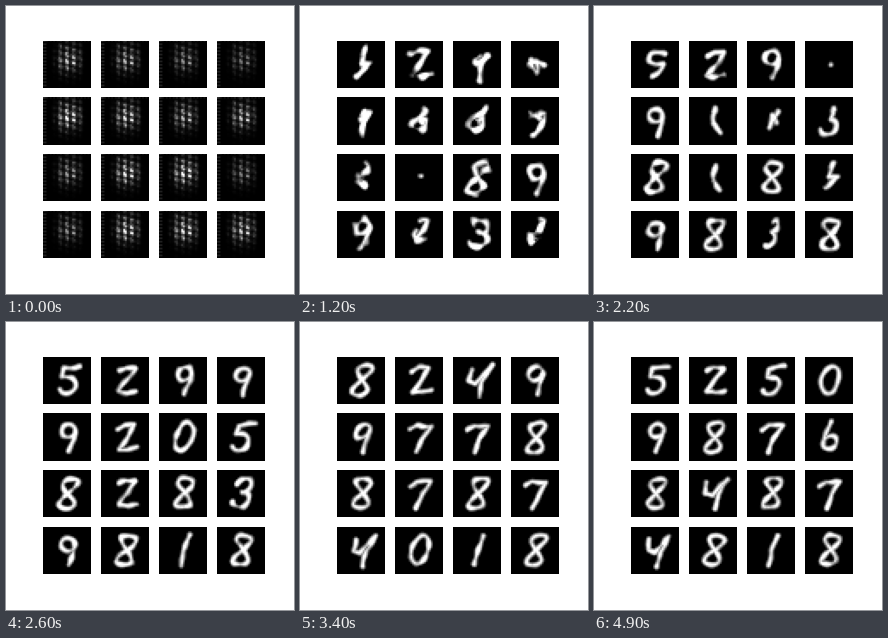
These frames come from a looping animation (288 px wide and 288 px high, 5.1 s). A matplotlib script:

```python
import numpy as np
import matplotlib.pyplot as plt
from matplotlib.animation import FuncAnimation

SIZE, FRAMES, LAST = 28, 51, 49
KEYS = [6, 18, 26, 34, 42, 49]  # epochs at which a tile resembles each of its digits
DIGITS = ["395885", "222222", "499455", "369900",
          "499999", "892798", "890777", "435886",
          "188888", "692794", "888888", "993777",
          "999444", "388008", "331111", "188888"]

Y, X = np.mgrid[0:SIZE, 0:SIZE].astype(float)


def arc(cx, cy, rx, ry, start, stop):
    t = np.radians(np.linspace(start, stop, 30))
    return np.column_stack([cx + rx * np.cos(t), cy + ry * np.sin(t)])


def stroke(*parts, n=64):
    """Join points and arcs into one pen stroke of n evenly spaced points."""
    path = np.vstack(parts)
    steps = np.hypot(*np.diff(path, axis=0).T)
    length = np.concatenate([[0], np.cumsum(steps)])
    at = np.linspace(0, length[-1], n)
    return np.column_stack([np.interp(at, length, axis) for axis in path.T])


def figure_eight():
    t = np.linspace(0, 2 * np.pi, 80)
    return np.column_stack([.75 * np.sin(2 * t), -np.cos(t)])


NINE = stroke(arc(-.1, -.4, .7, .45, -20, -380), (.5, 0), (.3, 1))
PEN = {
    "0": stroke(arc(0, 0, .85, .95, -60, 300)),
    "1": stroke((.3, -1), (-.1, 0), (-.1, 1)),
    "2": stroke((-.9, -.6), (-.3, -.85), (.7, -.85), (.1, 0), (-.6, .8), (.3, .85), (1.2, .7)),
    "3": stroke(arc(0, -.5, .75, .45, 200, 450), arc(0, .4, .85, .5, -90, 160)),
    "4": stroke((-.9, -.7), (-.9, .05), (-.2, .2), (1.1, -1), (.4, .1), (.4, 1.1)),
    "5": stroke((1, -.95), (-.6, -.75), (-.7, -.2), arc(0, .4, .8, .55, -90, 150)),
    "6": -NINE,
    "7": stroke((-1.2, -.5), (-.6, -.8), (.8, -.75), (.2, .1), (-.1, 1)),
    "8": stroke(figure_eight()),
    "9": NINE,
}


def waves(rng, scale, epoch):
    """Smooth noise that drifts a little from epoch to epoch."""
    angles, phases = rng.uniform(0, 2 * np.pi, (2, 5))
    drift = rng.normal(0, .25, 5) * epoch
    return sum(np.sin(scale * (X * np.cos(a) + Y * np.sin(a)) + p + d)
               for a, p, d in zip(angles, phases, drift)) / 2.5


def pen_points(index, epoch):
    place = np.interp(epoch, KEYS, range(len(KEYS)))
    i = min(int(place), len(KEYS) - 2)
    u = place - i
    u = u * u * (3 - 2 * u)
    x, y = ((1 - u) * PEN[DIGITS[index][i]] + u * PEN[DIGITS[index][i + 1]]).T
    return 14.3 + 5.8 * x - 1.6 * y, 13.6 + 8.6 * y


def digit(index, epoch):
    """A soft stroke, torn into blobs early on and cleaner with every epoch."""
    rng = np.random.default_rng(20 + index)
    youth = np.exp(-epoch / 9)
    bend, p, q = .4 + youth, *rng.uniform(0, 2 * np.pi, 2)
    px, py = pen_points(index, epoch)
    px, py = (px + bend * np.sin(.3 * py + p + .3 * epoch),
              py + bend * np.sin(.3 * px + q - .3 * epoch))
    gap = np.hypot(X[..., None] - px, Y[..., None] - py).min(axis=-1)
    tear = (.35 + 2.4 * youth) * waves(rng, .75, epoch)
    return np.clip(.5 + (1.25 + .4 * youth + tear - gap) / 1.7, 0, 1)


def lattice(index):
    """Untrained output: a faint dotted grid, brightest above the middle."""
    grain = np.random.default_rng(5).uniform(.3, 1.1, X.shape)
    gain = np.random.default_rng(index).uniform(.6, 1.5)
    columns = .1 + np.cos(np.pi * (X - 9.5) / 4) ** 2
    rows = .25 + .75 * np.cos(np.pi * (Y - 8 - .3 * X) / 4) ** 2
    envelope = np.exp(-((X - 14.5) / 7) ** 4 - ((Y - 10.5) / 7.5) ** 2)
    border = .13 * (X < 2) * (Y % 2 == 0) + .07 * (Y < 1) * (X % 2 == 0)
    return np.clip(gain * grain * columns * rows * envelope + border, 0, 1)


def picture(index, epoch):
    grown = min(1, epoch / 2)
    return np.maximum(grown * digit(index, epoch), max(0, 1 - epoch / 3) * lattice(index))


fig, axes = plt.subplots(4, 4, figsize=(4, 4), dpi=72, facecolor="white")
fig.subplots_adjust(left=.125, right=.9, bottom=.125, top=.88, wspace=.2, hspace=.2)
images = []
for ax in axes.flat:
    ax.axis("off")
    images.append(ax.imshow(np.zeros((SIZE, SIZE)), cmap="gray", vmin=0, vmax=1))


def update(frame):
    for index, image in enumerate(images):
        image.set_data(picture(index, min(frame, LAST)))
    return images


anim = FuncAnimation(fig, update, frames=FRAMES, interval=100, repeat=True, repeat_delay=0)
plt.show()
```
